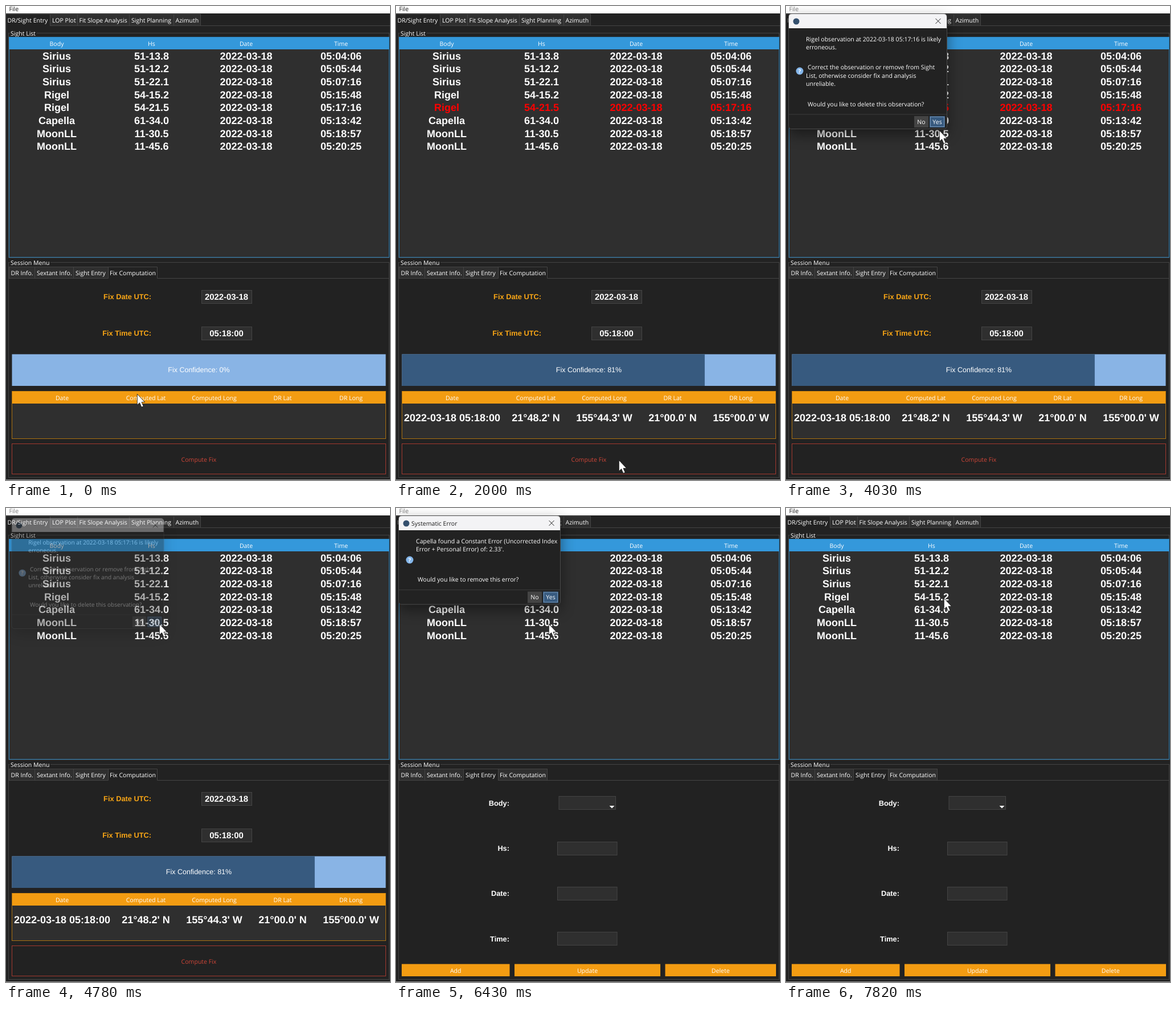
An HTML page that plays this animation: 674x831 px, repeating every 8 s.

```html
<!DOCTYPE html>
<html lang="en">
<head>
<meta charset="utf-8">
<title>Sight fix</title>
<style>
  html, body { margin: 0; width: 100%; height: 100%; overflow: hidden; background: #222; }
  svg { display: block; width: 100%; height: 100%; }
  text { font: 10.55px "Open Sans", "Noto Sans", sans-serif; fill: #fff; white-space: pre; text-rendering: geometricPrecision; }
  .mid { text-anchor: middle; }
  .end { text-anchor: end; }
  .cell, .label, .entry { font-family: "Liberation Sans", Arial, sans-serif; font-weight: bold; }
  .cell { font-size: 18px; }
  .label { font-size: 12.8px; }
  .entry { font-size: 14.9px; }
  .bar { font: 12.5px "Liberation Sans", Arial, sans-serif; }
  .orange { fill: #f7a516; }
  .dark { fill: #1b1b1b; }
  .red text { fill: #f00; }
  .dialog { filter: drop-shadow(0 9px 12px rgba(0, 0, 0, .45)); transform-box: fill-box; transform-origin: center; }
</style>
</head>
<body>
<svg id="stage" viewBox="0 0 674 831"></svg>
<script>
const BG = '#222', FIELD = '#2f2f2f', LINE = '#444', BLUE = '#3498db', NAVY = '#375a7f',
      ORANGE = '#f39c12', RED = '#e74c3c';
const LOOP = 8000, ROW = 22.68, DELETED = 4;

const text = (x, y, s, cls = '', attrs = '') => `<text x="${x}" y="${y}" class="${cls}" ${attrs}>${s}</text>`;
const rect = (x1, y1, x2, y2, fill, stroke = 'none', attrs = '') =>
  `<rect x="${x1}" y="${y1}" width="${x2 - x1}" height="${y2 - y1}" fill="${fill}" stroke="${stroke}" ${attrs}/>`;
const group = (id, body, attrs = '') => `<g id="${id}" ${attrs}>${body}</g>`;

function tabs(edges, names, textX, top, bottom, active) {
  return names.map((name, i) => {
    const [a, b] = [edges[i], edges[i + 1]];
    const shape = i === active
      ? rect(a, top, b, bottom + 1, BG) + `<path d="M${a} ${bottom}V${top}H${b}V${bottom}" fill="none" stroke="${LINE}"/>`
      : rect(a, top, b, bottom, FIELD, LINE);
    return shape + text(textX[i], bottom - 5.8, name);
  }).join('');
}

const frame = (y1, y2, name, width) =>
  rect(4.5, y1, 672.5, y2, 'none', LINE) + rect(7, y1 - 2, 9 + width, y1 + 2, BG) + text(8, y1 + 4, name);

function sightTable() {
  const centers = [89, 255.5, 421.5, 588];
  const sights = [
    ['Sirius', '51-13.8', '05:04:06'], ['Sirius', '51-12.2', '05:05:44'], ['Sirius', '51-22.1', '05:07:16'],
    ['Rigel', '54-15.2', '05:15:48'], ['Rigel', '54-21.5', '05:17:16'], ['Capella', '61-34.0', '05:13:42'],
    ['MoonLL', '11-30.5', '05:18:57'], ['MoonLL', '11-45.6', '05:20:25']];
  const heads = ['Body', 'Hs', 'Date', 'Time'].map((s, i) => text(centers[i], 69.8, s, 'mid')).join('');
  const rows = sights.map(([body, hs, time], r) => group('row' + r,
    [body, hs, '2022-03-18', time].map((s, i) => text(centers[i], 93.5 + ROW * r, s, 'cell mid')).join('')));
  return rect(5.5, 54.5, 672.5, 440.5, FIELD, '#2c7fb5') + rect(5.5, 55, 672, 76, BLUE) + heads + rows.join('');
}

const sessionTabs = active =>
  tabs([5.5, 50.5, 118.5, 179.5, 265.5], ['DR Info.', 'Sextant Info.', 'Sight Entry', 'Fix Computation'],
    [8.5, 54, 122, 182], 457.5, 477.5, active);

function fixPanel() {
  const centers = [98.5, 245.5, 365.5, 485.5, 605.5];
  const heads = ['Date', 'Computed Lat', 'Computed Long', 'DR Lat', 'DR Long'];
  const result = ['2022-03-18 05:18:00', "21°48.2' N", "155°44.3' W", "21°00.0' N", "155°00.0' W"];
  return sessionTabs(3) +
    text(255, 514, 'Fix Date UTC:', 'label end orange') + text(255, 578, 'Fix Time UTC:', 'label end orange') +
    rect(343.5, 498.5, 431.5, 521.5, FIELD, LINE) + text(387, 515.3, '2022-03-18', 'entry mid') +
    rect(343.5, 562.5, 431.5, 585.5, FIELD, LINE) + text(387, 579.3, '05:18:00', 'entry mid') +
    rect(10.5, 610.5, 666.5, 666, '#89b4e5') +
    group('progress', rect(10.5, 610.5, 10.5 + 656 * .81, 666, NAVY)) +
    text(338.5, 642.3, '', 'bar mid', 'id="confidence"') +
    rect(10.5, 675.5, 666.5, 758.5, FIELD, '#a97011') + rect(11, 675.5, 666, 697, ORANGE) +
    heads.map((s, i) => text(centers[i], 690.8, s, 'mid')).join('') +
    group('result', result.map((s, i) => text(centers[i], 728.2, s, 'cell mid')).join('')) +
    rect(10.5, 767.5, 666.5, 820.5, BG, '#a3392f', 'id="compute"') +
    text(338.5, 798.5, 'Compute Fix', 'mid', 'id="computeText"');
}

function entryPanel() {
  const fields = ['Body:', 'Hs:', 'Date:', 'Time:'].map((name, i) => {
    const y = 517.3 + 79.3 * i, inset = i ? 0 : 2.5;
    return text(199, y + 4.3, name, 'label end') +
      rect(283.5 + inset, Math.round(y - 12) + .5, 388 - inset, Math.round(y + 11) + .5, FIELD, LINE);
  }).join('');
  const button = (a, b, name) => rect(a, 799.5, b, 821, ORANGE) + text((a + b) / 2, 814.6, name, 'mid');
  return sessionTabs(2) + fields + '<path d="M374.5 522h9l-4.5 4.5z" fill="#fff"/>' +
    button(10, 199.5, 'Add') + button(208, 464, 'Update') + button(472.5, 667, 'Delete');
}

function dialog(id, right, bottom, title, iconY, lines) {
  const bar = bottom - 25.5, top = bottom - 22.5;
  return group(id,
    rect(4.5, 13.5, right, bottom, BG, '#4a4a4a', 'rx="5"') +
    `<path d="M5 39V19q0-5 5-5H${right - 5.5}q5 0 5 5V39z" fill="#f3f3f5"/>` +
    '<circle cx="18" cy="27" r="5.5" fill="#34506e"/>' + text(27, 30.7, title, 'dark') +
    `<path d="M${right - 20} 22l9 9m0-9l-9 9" stroke="#222" fill="none"/>` +
    lines.map(([x, y, s]) => text(x, y + 3.7, s)).join('') +
    `<circle cx="24" cy="${iconY}" r="6.5" fill="#84b6ea"/>` +
    text(24, iconY + 3.6, '?', 'mid', 'style="font-size:10px;font-weight:bold"') +
    `<path d="M5 ${bar}H${right}" stroke="#3a3a3a"/>` +
    rect(right - 57.5, top, right - 32.5, bottom - 2.5, LINE) + text(right - 45, bottom - 8.6, 'No', 'mid') +
    rect(right - 30.5, top, right - 3.5, bottom - 2.5, NAVY, 'none', `id="${id}Yes"`) +
    rect(right - 29, top + 1.5, right - 5, bottom - 4, 'none', '#a9c4e2', 'stroke-dasharray="1 1"') +
    text(right - 17, bottom - 8.6, 'Yes', 'mid'), 'class="dialog"');
}

document.getElementById('stage').innerHTML =
  rect(0, 0, 674, 831, BG) + rect(0, 0, 674, 13, '#fff') + rect(0, 830, 674, 831, '#8c8c8c') +
  text(5.5, 8.8, 'File', 'dark', 'id="file"') +
  `<path d="M0 34.5H674" stroke="${LINE}"/>` +
  tabs([-.5, 77.5, 125.5, 216.5, 294.5, 341.5],
    ['DR/Sight Entry', 'LOP Plot', 'Fit Slope Analysis', 'Sight Planning', 'Azimuth'],
    [2.5, 81, 128.5, 220, 297.5], 14.5, 34.5, 0) +
  frame(47.5, 441.5, 'Sight List', 45) + sightTable() +
  frame(449.5, 826.5, 'Session Menu', 69) + `<path d="M5 477.5H672" stroke="${LINE}"/>` +
  group('fix', fixPanel()) + group('sightEntry', entryPanel()) +
  dialog('erroneous', 282.5, 215.5, '', 114, [
    [35, 58, 'Rigel observation at 2022-03-18 05:17:16 is likely'], [35, 72.3, 'erroneous.'],
    [38, 107.5, 'Correct the observation or remove from Sight'], [35, 122, 'List, otherwise consider fix and analysis'],
    [35, 136.5, 'unreliable.'], [38, 172, 'Would you like to delete this observation?']]) +
  dialog('systematic', 288.5, 169, 'Systematic Error', 91, [
    [35, 58, 'Capella found a Constant Error (Uncorrected Index'], [35, 72.3, "Error + Personal Error) of: 2.33'."],
    [38, 125.3, 'Would you like to remove this error?']]) +
  group('tip', rect(11, 5, 296, 90, '#fcf4d4') + text(16.5, 22, 'To Compute a Fix:', 'dark') +
    text(16.5, 36.5, "1. Enter a Date and Time in UTC that you'd like to", 'dark')) +
  group('cursor', '<path d="M.3 .3V19.5L4.6 15.6L7.8 23.2L11.2 21.8L8 14.4H13.6Z" fill="#fff" stroke="#111" stroke-width=".8"/>');

const el = id => document.getElementById(id);
const show = (id, on) => { el(id).style.display = on ? '' : 'none'; };
const fill = (id, color) => el(id).setAttribute('fill', color);

// start, end, steps, destination x, y
const moves = [
  [70, 140, 2, 380, 808], [540, 890, 6, 391, 796], [3280, 4030, 12, 269, 218], [4100, 4310, 4, 269, 203],
  [6430, 6430, 1, 268, 203], [6500, 6700, 4, 265, 184], [6770, 7190, 7, 276, 158], [7260, 7330, 2, 277, 158]];

function cursorAt(t) {
  let x = 230, y = 680;
  for (const [start, end, steps, toX, toY] of moves) {
    if (t < start) break;
    const gap = (end - start) / (steps - 1) || 1;
    const p = Math.min(1, (Math.floor((t - start) / gap + 1e-6) + 1) / steps);
    const eased = p * p * (3 - 2 * p);
    x += (toX - x) * eased;
    y += (toY - y) * eased;
  }
  return [x, y];
}

// start time, opacity held from then on
const fades = {
  erroneous: [[0, 0], [2110, .45], [2210, .9], [2320, 1], [4780, .35], [4860, 0]],
  systematic: [[0, 0], [5060, .6], [5150, 1], [7620, .7], [7690, .3], [7750, .08], [7820, 0]]
};

function render(t) {
  const within = (a, b) => t >= a && t < b;
  const hover = within(70, 1330), solved = t >= 2000, removed = t >= 4780;

  const [x, y] = cursorAt(t);
  el('cursor').setAttribute('transform', `translate(${x} ${y})`);
  el('tip').setAttribute('transform', `translate(${x} ${y})`);
  show('tip', within(540, 1200));

  fill('compute', hover ? RED : BG);
  el('computeText').style.fill = hover ? '#fff' : '#cf4538';
  show('progress', solved);
  show('result', solved);
  el('confidence').textContent = `Fix Confidence: ${solved ? 81 : 0}%`;

  show('fix', t < 4860);
  show('sightEntry', t >= 4860);
  el('row' + DELETED).setAttribute('class', solved ? 'red' : '');
  show('row' + DELETED, !removed);
  for (let r = DELETED + 1; r < 8; r++)
    el('row' + r).setAttribute('transform', `translate(0 ${removed ? -ROW : 0})`);

  let modal = false;
  for (const id in fades) {
    const opacity = fades[id].filter(step => t >= step[0]).pop()[1];
    modal = modal || opacity > .3;
    show(id, opacity > 0);
    el(id).style.opacity = opacity;
    el(id).style.transform = `scale(${.94 + .06 * opacity})`;
  }
  el('file').style.fill = modal ? '#7d7d7d' : '#1b1b1b';
  fill('erroneousYes', within(4580, 4860) ? '#2c4866' : NAVY);
  fill('systematicYes', within(7480, 7820) ? '#2c4866' : NAVY);
}

const origin = performance.now();
function tick() {
  render((performance.now() - origin) % LOOP);
  requestAnimationFrame(tick);
}
tick();
</script>
</body>
</html>
```
